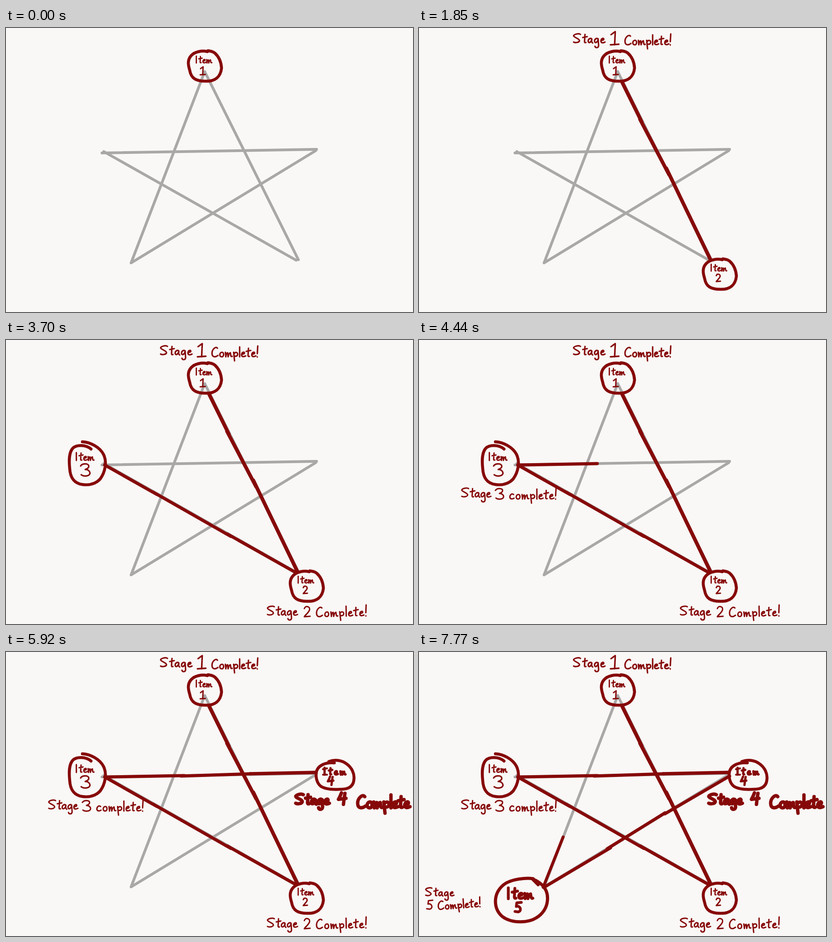
Animation, 895 px wide and 625 px high, one loop 8 s. Source, as an HTML page:

```html
<!DOCTYPE html>
<html lang="en">
<head>
<meta charset="utf-8">
<title>Star stages</title>
<style>
html, body { margin: 0; width: 100%; height: 100%; overflow: hidden; background: #f9f8f6; }
svg { display: block; width: 100%; height: 100%; fill: none; stroke-linecap: round; stroke-linejoin: round; }
</style>
</head>
<body>
<svg id="stage" viewBox="0 0 895 625"></svg>
<script>
const RED = '#860909', GRAY = '#a9a8a7';
const STEP = 370, LOOP = 8000;

// Pen strokes per letter: advance, path (baseline at 0, x-height 10)
const bowl = 'M9-9C5-12 1-8 1-4C1 1 7 0 9-8';
const pen = {
  S: [22, 'M17-19C13-22 3-19 2-16C2-12 15-10 15-5C14-1 6 0 2-2'],
  t: [11, 'M5-19L4-3Q4 0 7-1M0-12L10-14'],
  a: [14, bowl + 'Q8-1 11 0'],
  g: [14, bowl + 'L10 6C9 12 2 11 2 7'],
  e: [11, 'M1-5L7-7C9-12 2-11 1-5C1 1 6 0 10-2'],
  I: [9, 'M2-20L2 0'],
  l: [5, 'M2-22L2 0'],
  m: [18, 'M1-10L2 0Q3-9 6-9L7 0Q9-9 12-9L13-2Q14 0 16-1'],
  C: [17, 'M13-19C9-24 1-16 1-8C1 2 9 1 14-3'],
  c: [13, 'M9-10C4-14 0-7 1-3C3 1 7 0 10-2'],
  o: [12, 'M6-10C0-10-1 0 5 0C11 0 10-10 6-10'],
  p: [12, 'M1-10L3 9M2-7C6-13 12-8 9-3Q6 0 3-2'],
  '!': [4, 'M3-24L2-7M2 0L2 .3'],
  1: [14, 'M1-17L8-22L7 0M0 0L14-1'],
  2: [14, 'M1-17C3-24 13-22 12-15C11-9 2-3 1 0L13-1'],
  3: [15, 'M0-17C3-22 15-22 14-16C14-13 10-12 8-11C14-11 18-6 15-2C12 1 4 1 1-2'],
  4: [16, 'M7-21Q4-13 1-8L16-10M14-20Q12-10 11 2'],
  5: [14, 'M14-21L4-20L3-12C12-15 16-2 7 0L0-1']
};

const path = (d, width, color = RED) =>
  `<path d="${d}" stroke="${color}" stroke-width="${width}"/>`;

function write(text, x, y, size, width = 3, track = 0, tilt = 0) {
  let at = 0, out = '';
  for (const ch of text) {
    const [advance, d] = pen[ch];
    out += `<path transform="translate(${at})" d="${d}"/>`;
    at += advance + track / size;
  }
  return `<g role="img" aria-label="${text}" stroke="${RED}" stroke-width="${width / size}"
    transform="translate(${x} ${y}) rotate(${tilt}) scale(${size})">${out}</g>`;
}

const ring = (x, y) => `<g transform="translate(${x} ${y})">` + path(
  'M42 2C30-1 14 2 6 11C-3 21 0 33 3 43C6 61 17 67 37 67C58 68 71 58 73 38C72 24 66 12 58 5C53 1 48 1 43 0', 6.5) + '</g>';

const star = path('M437 96L275 517L681 270', 6, GRAY) +
  path('M437 96L643 510', 6, GRAY) +
  path('M211 275L683 267', 6, GRAY) +
  path('M215 272L638 511', 6, GRAY);

// One entry per step; entries stay on screen until the loop restarts
const steps = [
  star + ring(401, 50) + write('Item', 417, 77, .76, 2.8) + write('1', 427, 103, .8, 3),
  write('Stage', 338, 33, 1, 3.2) + write('1', 421, 37, 1.32, 3.4) + write('Complete!', 452, 37, 1, 3.2, .2),
  path('M446 118L490 207', 8),
  path('M486 201L550 323', 8),
  path('M544 309L641 510', 8),
  ring(625, 508) + write('Item', 641, 535, .76, 2.8) + write('2', 653, 558, .76, 3),
  write('Stage', 573, 606, 1, 3, -.7) + write('2', 655, 609, 1.05) + write('Complete!', 682, 609, 1, 3, 1.3, -1),
  path('M634 510L487 427', 7),
  path('M497 427L322 333', 7),
  path('M494 432L324 335M332 340L217 275', 7),
  path('M168 224C186 225 206 236 214 251C223 268 218 291 207 306C197 317 182 320 168 318C148 315 141 301 140 282C138 262 139 247 147 238C155 230 176 230 187 240', 6.5) +
    write('Item', 153, 265, .86) + write('3', 164, 299, 1.28, 3.2),
  write('Stage', 92, 346, 1, 3, -1.2) + write('3', 168, 350, 1.12) + write('complete!', 199, 350, 1, 3, .8),
  path('M222 275L392 272', 7),
  path('M385 273L538 268', 7),
  path('M537 268L681 265', 7.5),
  path('M710 241C724 236 739 238 750 247C760 254 767 268 765 281C764 294 756 301 740 302C722 303 705 303 693 296C683 289 680 273 683 262C687 250 702 242 722 244', 6.5) +
    write('Item', 699, 270, .76, 5, 4) + path('M697 258L706 256M697 270L706 270', 4) + write('4', 707, 291, .8, 5),
  write('Stage', 635, 335, 1.1, 7.5, -.5) + write('4', 730, 333, 1.1, 7.5) + write('Complete', 772, 343, 1.3, 7.5, -1.2),
  path('M683 273L541 356', 7),
  path('M541 354L414 433', 7),
  path('M421 431L278 516', 7) +
    path('M251 499C239 497 201 498 184 514C163 533 163 564 183 582C204 598 244 598 265 580C286 562 289 530 270 512Q260 503 250 500L262 512', 7) +
    write('Item', 194, 543, 1.2, 6.2) + write('5', 211, 572, 1, 6),
  write('Stage', 13, 537, .9) + write('5', 17, 566, .94) + write('Complete!', 42, 567, .9, 3, .4, -4),
  path('M273 518L317 407', 6.5)
];
// This line is redrawn a little lower by the next step
const REDRAWN = 8;

const svg = document.getElementById('stage');
svg.innerHTML = steps.map(s => `<g>${s}</g>`).join('');
const layers = [...svg.children];

function draw(ms) {
  const now = Math.floor((ms % LOOP) / STEP);
  layers.forEach((g, i) => {
    const shown = i === REDRAWN ? i === now : i <= now;
    g.style.display = shown ? '' : 'none';
  });
}

const start = performance.now();
function tick() {
  draw(performance.now() - start);
  requestAnimationFrame(tick);
}
tick();
</script>
</body>
</html>
```
